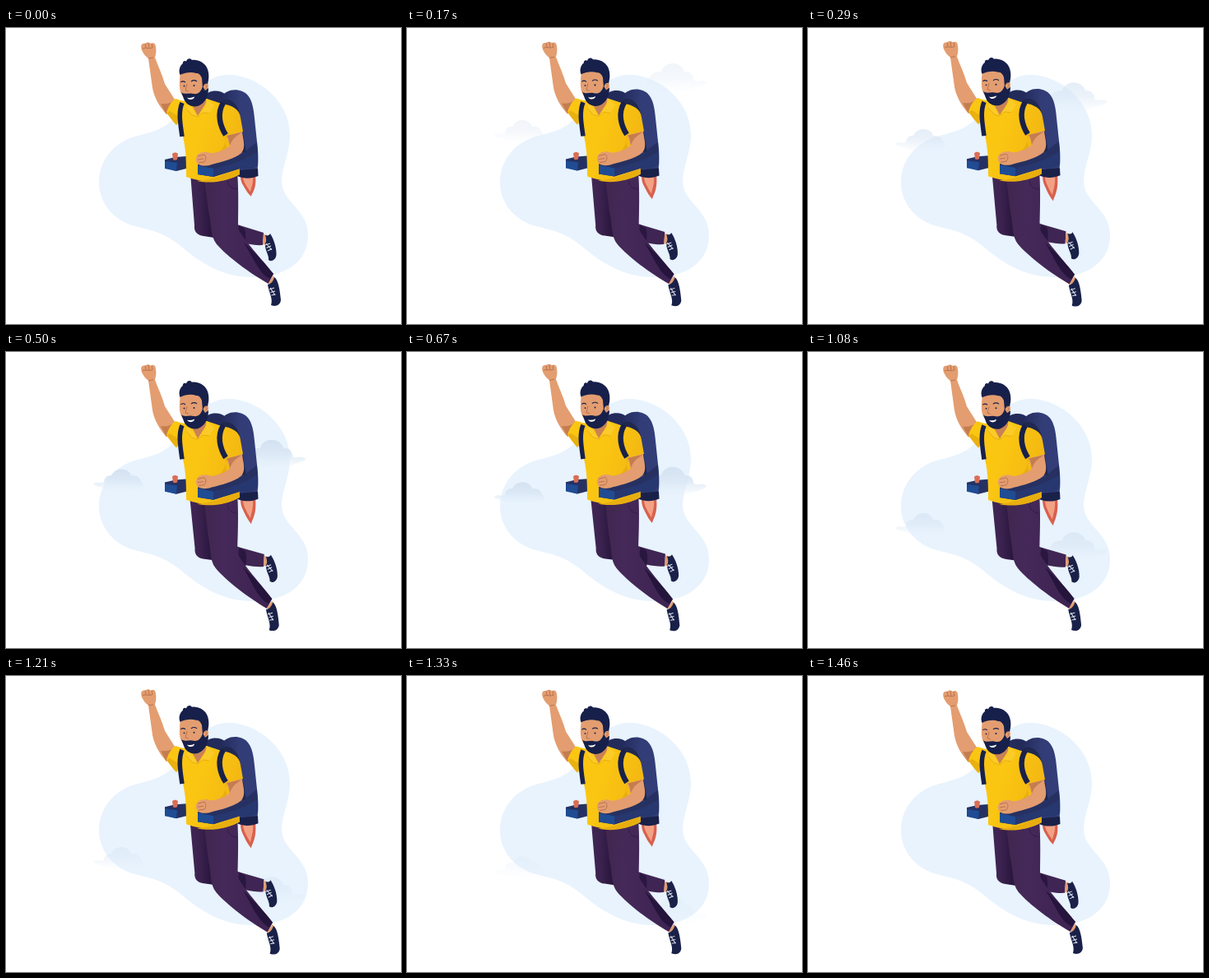
Recreate the animation shown at these times as an HTML page. Size 480 px wide and 360 px high, loop 1500 ms.

```html
<!DOCTYPE html>
<html lang="en">
<head>
<meta charset="utf-8">
<title>Jetpack flight</title>
<style>
html, body { margin: 0; width: 100%; height: 100%; overflow: hidden; background: #fff; }
svg { display: block; width: 100%; height: 100%; }
</style>
</head>
<body>
<svg viewBox="0 0 480 360">
  <defs>
    <linearGradient id="mist" x1="0" y1="0" x2="0" y2="1">
      <stop offset="0" stop-color="#d3e1f1"/>
      <stop offset=".5" stop-color="#d9e6f4" stop-opacity=".85"/>
      <stop offset="1" stop-color="#e4effa" stop-opacity=".15"/>
    </linearGradient>
    <linearGradient id="pack" x1="0" y1="0" x2="1" y2=".1">
      <stop offset="0" stop-color="#232c5c"/>
      <stop offset=".5" stop-color="#323c76"/>
      <stop offset="1" stop-color="#333d78"/>
    </linearGradient>
    <linearGradient id="shirt" x1="0" y1="0" x2="1" y2=".3">
      <stop offset=".5" stop-color="#fbc612"/>
      <stop offset="1" stop-color="#f3b812"/>
    </linearGradient>
    <linearGradient id="backLeg" gradientUnits="userSpaceOnUse" x1="224" y1="0" x2="276" y2="0">
      <stop offset="0" stop-color="#422755"/>
      <stop offset=".22" stop-color="#3b224e"/>
      <stop offset=".45" stop-color="#2a1740"/>
      <stop offset="1" stop-color="#3f2553"/>
    </linearGradient>
    <linearGradient id="frontLeg" x1="0" y1="0" x2="1" y2="0">
      <stop offset="0" stop-color="#41264f"/>
      <stop offset=".3" stop-color="#452959"/>
      <stop offset="1" stop-color="#3d2351"/>
    </linearGradient>
    <path id="cloud" fill="url(#mist)" d="M0 18 C4 14 9 18 13 16 C13 11 17 7 22 8 C24 3 29 0 34 0 C41 0 45 4 46 8 C52 7 57 10 58 15 C62 17 61 22 58 24 C45 28 25 27 14 24 C9 21 3 22 0 18Z"/>
  </defs>
  <rect width="480" height="360" fill="#fff"/>
  <path fill="#e8f3fd" d="M270 57 C306 57 345 89 345 130 C345 152 335 168 335 187 C336 213 367 220 367 252 C367 284 340 303 300 303 C262 303 236 285 212 265 C190 247 174 246 153 240 C128 232 113 210 113 188 C113 160 132 138 160 131 C180 126 194 122 206 108 C222 86 240 57 270 57Z"/>
  <use id="cloudL" href="#cloud"/>
  <use id="cloudR" href="#cloud"/>

  <g id="flame">
    <path fill="#d9604d" d="M-9 -2 C-9 6 -6 9 -4 13 C-2 17 1 21 4 24 C5 19 11 14 9 -3Z"/>
    <path fill="#f2a184" d="M-6 -2 C-6 5 -3 8 -1 12 L3 18 C4 12 7 8 6 -3Z"/>
  </g>

  <g id="rearLeg">
    <path fill="url(#backLeg)" d="M224 176 L250 180 L262 232 L284 240 L313 249 L312 264 C300 265 285 260 272 258 L240 253 C232 252 228 247 229 240Z"/>
    <path fill="#2a1740" d="M283 240 L290 244 C292 252 291 258 290 263 L280 261Z"/>
    <path fill="#e39d70" d="M313 251 L318 252 L316 264 L312 263Z"/>
    <path fill="#192149" d="M315 252 C318 253 320 252 321 250 C325 256 329 267 328.500 276 C328 282 322 285 319 282 C320 276 314 270 315 262 C317 259 316 255 315 252Z"/>
    <path stroke="#dfe3ee" fill="none" d="M315 264 L321 262 M316.500 267.500 L322 265 M318 271 L323 268.500 M316 262 L323 270"/>
  </g>

  <g id="foreLeg">
    <path fill="url(#frontLeg)" d="M240 176 L281 174 C283 200 282 224 282 244 C289 258 310 280 325 299 L319 311 C296 298 269 278 256 263 C248 253 250 240 246 222Z"/>
    <path fill="#25143b" d="M289 261 C299 270 313 284 325 299 L321 305 C307 298 302 282 289 261Z"/>
    <path stroke="#2c1947" stroke-width=".8" fill="none" d="M269 186 C270 192 274 195 281 196"/>
    <path fill="#e39d70" d="M319 310 L325 301 L327 306 L321 313Z"/>
    <path fill="#192149" d="M318 312 C323 311 325 307 326 303 C331 306 333 320 334 331 C333 338 327 339 322 337 C325 329 319 321 318 312Z"/>
    <path stroke="#dfe3ee" fill="none" d="M320 318 L326 316 M321.500 321.500 L327 320 M322.500 325 L327.500 324 M321 316 L327 325"/>
  </g>

  <g id="torso">
    <path fill="#232b5b" d="M239 84 C246 75 260 74 268 82 L278 112 L248 100Z"/>
    <path fill="url(#pack)" d="M262 85 C266 73 286 72 294 82 C299 88 301 98 302 110 L306 148 C307 165 306 172 304 178 L282 180 L272 110Z"/>
    <path fill="#20284f" d="M262 88 C272 84 281 92 284 104 L292 152 L280 150 L270 108Z"/>
    <path fill="#1a2149" d="M283 173 L306 171 L306.500 180 C299 183 290 184 281 180Z"/>

    <path fill="#e39d70" d="M165 27 C163 21 165 18 169 19 C171 17 174 17 176 19 C179 17 182 19 182 23 C183 29 182 32 181 36 C185 47 190 57 193 68 L207 90 L195 105 C186 95 180 84 178 73 L173 37 C169 34 167 31 165 27Z"/>
    <path stroke="#b06a44" stroke-width=".8" fill="none" d="M169 19 L170 24 M173 18.500 L174 24 M177 19 L178 24 M166 25 C170 23 174 26 178 24 M173 37 L179 36"/>
    <path fill="#c47d50" d="M188 92 C194 93 199 92 205 88 L195 105Z"/>

    <path fill="#263162" d="M193 160 L206 157 L219 156 L219 171 L207 174 L193 170Z"/>
    <path fill="#1f4c93" d="M193 162 L208 164 L207 174 L193 171Z"/>
    <path fill="#d96e55" d="M202 153 C204 151 207 151 209 153 L208 160 C206 161 204 161 203 160Z"/>

    <path fill="url(#shirt)" d="M195 103 C197 96 201 89 206 86 C212 88 217 90 223 88 L244 86 L262 92 C275 94 284 99 285 109 L288 126 L269 132 C271 141 280 146 283 156 L284 178 C270 186 246 191 219 181 C219 164 219 149 215 132 L213 110 L207 118Z"/>
    <path fill="#e8ae10" d="M267 124 C270 138 264 148 256 153 L282 158 L284 178 C270 186 250 190 232 186 C252 184 268 179 276 170 C273 155 265 150 267 124Z"/>
    <path fill="#eab010" d="M207 118 C202 113 199 108 195 103 L199 101 C204 104 210 107 213 110Z"/>
    <path fill="#c98256" d="M224 90 L242 82 L244 90 L233 107Z"/>
    <path fill="#fbcb28" d="M221 89 L219 98 L226 106 L233 108 L224 94Z M244 86 L253 94 L247 104 L239 103 L233 108 L242 94Z"/>
    <path stroke="#e0a810" stroke-width=".8" fill="none" d="M219 98 L226 106 L233 108 L239 103 L247 104"/>
    <path stroke="#192149" stroke-width="5.500" fill="none" d="M214 91 C209 103 212 117 214 132"/>
    <path stroke="#192149" stroke-width="6.500" fill="none" d="M264 91 C256 104 260 119 267 130"/>

    <path fill="#263162" d="M233 166 L262 160 C280 156 290 153 293 148 L305 139 L306 163 C304 173 292 171 284 171 L252 181 L233 178Z"/>
    <path fill="#1f4c93" d="M233 167 L252 171 L252 181 L233 178Z"/>
    <path fill="#27376f" d="M252 171 C278 165 290 160 305 151 L306 163 C304 173 292 171 284 171 L252 181Z"/>
    <path fill="#e39d70" d="M268 131 L287 126 C288 136 292 145 286 152 C278 159 262 163 250 166 C242 169 232 168 231 161 C230 155 235 151 241 151 C246 150 247 153 252 152 C262 150 268 147 272 143Z"/>
    <path fill="#c47d50" d="M268 131 L286 127 C282 131 276 132 272 143 C271 138 271 134 268 131Z"/>
    <path stroke="#b06a44" stroke-width=".8" fill="none" d="M233 156 L241 154 M233 160 L240 159 M234 164 L241 163 M241 154 C244 157 243 160 241 163"/>

    <path fill="#e39d70" d="M212 52 C211 64 209 76 215 83 L230 91 L240 84 L245 75 C248 68 244 64 240 67 L240 50Z"/>
    <path fill="#17204a" d="M211.500 57 C209 51 212 45 215 43 C214 41 217 39 219 40.500 C220 37 224 36 226 39 C233 38 241 42 244 48 C247 54 247 61 245 68 C242 66 240 70 239 73 L238 61 C236 56 234 55 231 55 C225 53 218 54 211.500 57Z"/>
    <path fill="#17204a" d="M213 78 C217 82 223 78 228 80 C234 81 237 77 239 71 L242 76 L246 73 C246 83 242 92 233 95 C225 97 218 92 216 86Z"/>
    <path fill="#fff" d="M220 84.500 C223 85.500 226 85 229 83.500 C229 86 226 87.500 223.500 87 C222 87 221 86 220 84.500Z"/>
    <path stroke="#17204a" stroke-width="1.100" fill="none" d="M212.500 66 C214 64.500 216 64.500 218 66 M225 65 C227 63.500 230 63.500 232 65"/>
    <circle cx="216.500" cy="70.500" r=".9" fill="#17204a"/>
    <circle cx="228.500" cy="70" r="1" fill="#17204a"/>
    <path stroke="#b06a44" stroke-width=".8" fill="none" d="M220 68 L218 76 L222 77 M242 69 C245 69 244 73 242 74"/>
  </g>
</svg>
<script>
const LOOP = 1500;
const el = id => document.getElementById(id);
const put = (id, value) => el(id).setAttribute('transform', value);

// keys: [time, value] pairs in order
function blend(keys, t) {
  const i = keys.findIndex(k => k[0] > t);
  const [t0, a] = keys[i - 1], [t1, b] = keys[i];
  return a + (b - a) * (t - t0) / (t1 - t0);
}

const fade = [[0, 0], [40, .03], [290, .6], [500, 1], [880, .95], [1080, .65], [1330, .2], [1460, 0], [LOOP, 0]];
const thrust = [[0, 23], [290, 29], [500, 28], [880, 26], [1080, 30], [1330, 26], [1460, 23], [LOOP, 23]];

function draw(t) {
  const lift = Math.pow(Math.sin(Math.PI * t / LOOP), 1.3);
  put('torso', `translate(0 ${187 - 1.5 * lift}) scale(1 ${1 + .008 * lift}) translate(0 -187)`);
  put('rearLeg', `translate(0 ${-1.2 * lift}) rotate(${-1.6 * lift} 228 215)`);
  put('foreLeg', `rotate(${1.1 * lift} 250 190)`);
  put('flame', `translate(294 ${182 - lift}) scale(1 ${blend(thrust, t) / 24})`);

  put('cloudL', `translate(106 ${96.2 + .0924 * t})`);
  put('cloudR', `translate(364 ${9.8 + .1937 * t}) scale(-1.2 1.3)`);
  for (const id of ['cloudL', 'cloudR']) el(id).setAttribute('opacity', blend(fade, t));
}

const start = performance.now();
function tick() {
  draw((performance.now() - start) % LOOP);
  requestAnimationFrame(tick);
}
tick();
</script>
</body>
</html>
```
